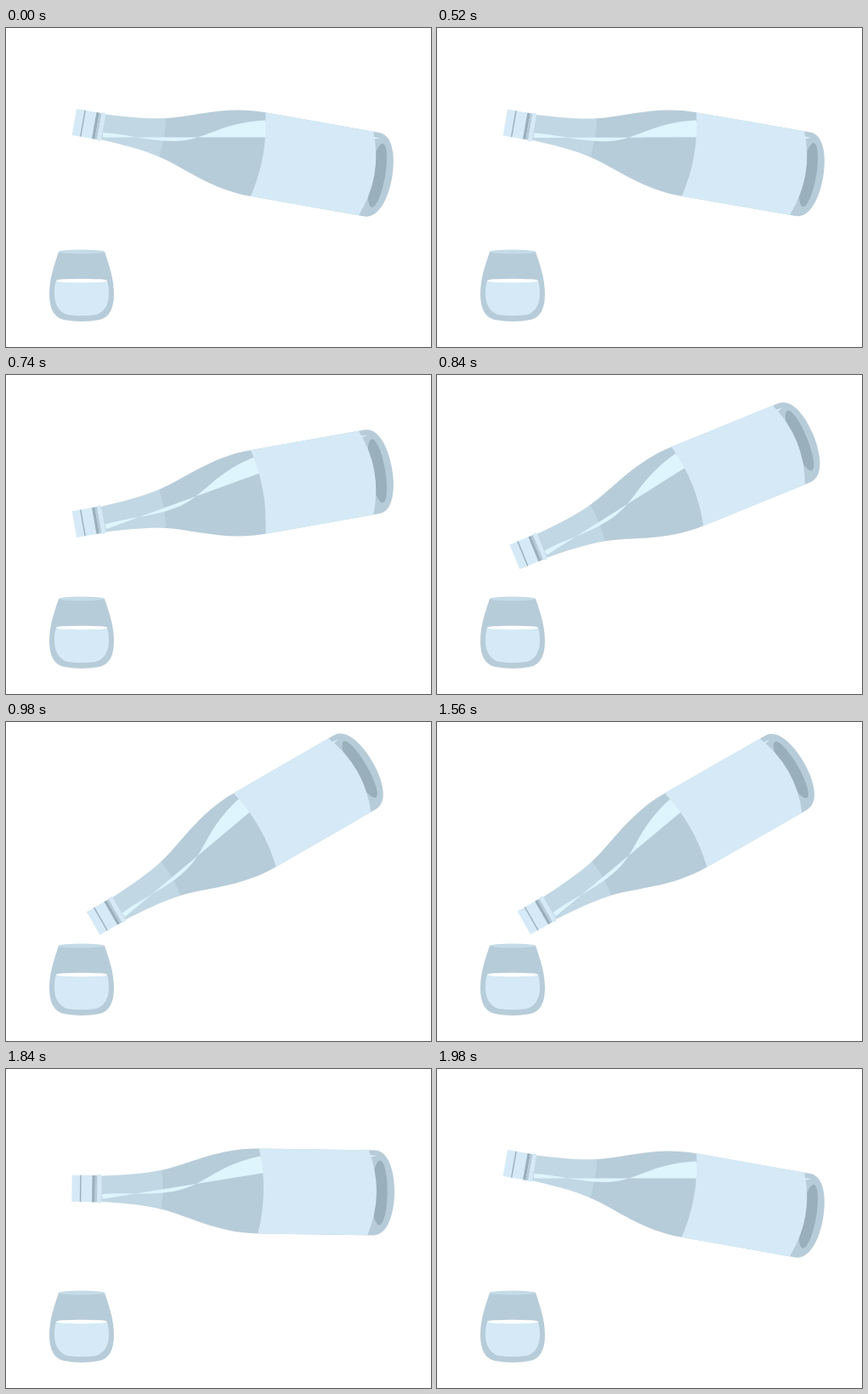
An HTML page that plays this animation: 500x375 px, repeating every 2 s.

```html
<!DOCTYPE html>
<html lang="en">
<head>
<meta charset="utf-8">
<title>Pouring bottle</title>
<style>
  html, body { margin: 0; width: 100%; height: 100%; overflow: hidden; background: #fff; }
  svg { display: block; width: 100%; height: 100%; }
  .glass { fill: #b7ccd9; }
  .neck { fill: #c1d7e4; }
  .pale { fill: #d5eaf6; }
  .dark { fill: #9aafbc; }
  .shine { fill: #dff5fe; }
</style>
</head>
<body>
<svg viewBox="0 0 500 375">
  <!-- tumbler -->
  <path class="glass" d="M62 263C57 278 51 294 51 313C51 330 57 341 68 343Q89 347 110 343C121 341 127 330 127 313C127 294 121 278 116 263Z"/>
  <ellipse fill="#c5dce8" cx="89" cy="263" rx="27" ry="2.5"/>
  <path class="pale" d="M59 297C57 303 57 308 57 312C57 326 63 334 72 337Q89 339.5 106 337C115 334 121 326 121 312C121 306 120 301 119 297Z"/>
  <ellipse fill="#fff" cx="89" cy="297" rx="30" ry="2.3"/>

  <!-- bottle, drawn lying along the x axis around its pivot -->
  <g id="bottle" transform="translate(265 143) rotate(10)">
    <path class="glass" d="M-84 -22.5L-82 -23C-50 -30.5 -16 -50 32 -50H168C185 -50 192 -24 192 0S185 50 168 50H32C-16 50 -50 30.5 -82 23L-84 22.5Z"/>
    <path class="neck" d="M-155 -15C-128 -16.5 -104 -18 -82 -23Q-79 0 -82 23C-104 18 -128 16.5 -155 15Z"/>
    <ellipse class="dark" cx="174.5" cy="0" rx="9.2" ry="38"/>
    <g class="shine" transform="rotate(-10) translate(-265 -143)">
      <path d="M114 123C140 124 165 133 197 133C235 133 250 111 305 108.5L312 128.5H114Z"/>
      <path d="M430 127.5L440.5 129.7L430 130.5Z"/>
    </g>
    <path class="pale" d="M32 -50H161Q181 0 161 50H32Q44 0 32 -50Z"/>
    <rect class="pale" x="-187.5" y="-15.7" width="30.5" height="31.4"/>
    <rect class="dark" x="-178" y="-15.7" width="1.4" height="31.4"/>
    <rect class="dark" x="-163.7" y="-15.7" width="3.4" height="31.4"/>
    <rect class="glass" x="-160.3" y="-15.7" width="2.8" height="31.4"/>
    <rect class="pale" x="-157.5" y="-16.8" width="4.8" height="33.6" rx="1.5"/>
  </g>
</svg>
<script>
  const LOOP = 2000, STEP = 20, RESTING = 10, POURING = -30;
  const bottle = document.getElementById('bottle');

  // Sine ease in and out, from 0 at start to 1 at end
  const ease = (time, start, end) => {
    const part = Math.min(1, Math.max(0, (time - start) / (end - start)));
    return (1 - Math.cos(Math.PI * part)) / 2;
  };

  function draw(now) {
    const time = Math.floor((now % LOOP) / STEP) * STEP;
    const tilt = ease(time, 500, 980) - ease(time, 1540, 1980);
    const angle = RESTING + (POURING - RESTING) * tilt;
    bottle.setAttribute('transform', `translate(265 143) rotate(${angle})`);
  }

  const startTime = performance.now();
  function tick() {
    draw(performance.now() - startTime);
    requestAnimationFrame(tick);
  }
  tick();
</script>
</body>
</html>
```
